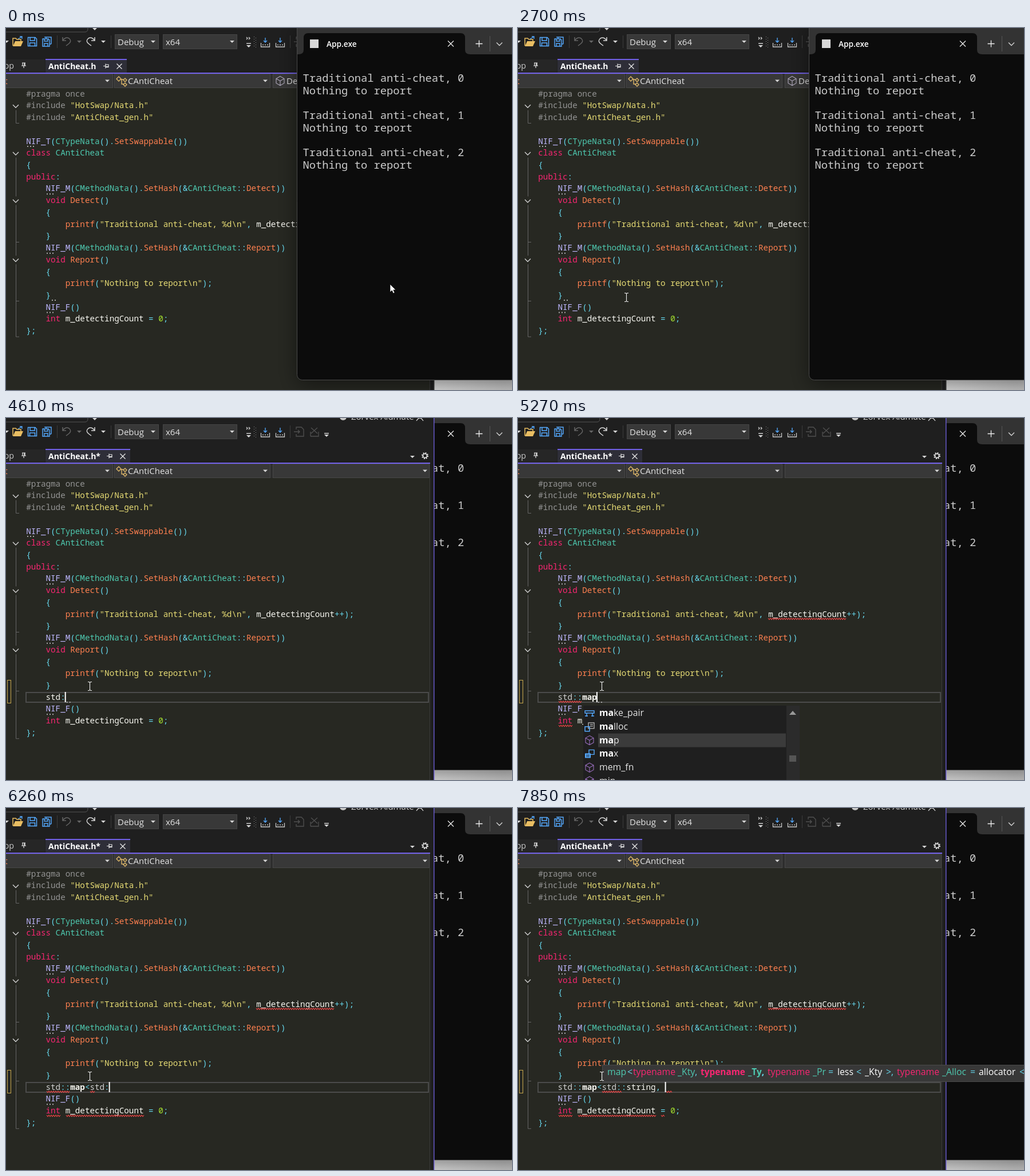
An HTML page with a canvas that plays this animation: 884 by 633 pixels, repeating every 8000 ms.

```html
<!DOCTYPE html>
<html lang="en">
<head>
<meta charset="utf-8">
<title>Live code editing</title>
<style>
html, body { margin: 0; width: 100%; height: 100%; overflow: hidden; background: #1f1f1f; }
canvas { display: block; width: 884px; height: 633px; }
</style>
</head>
<body>
<canvas id="stage" width="884" height="633"></canvas>
<script>
const ctx = document.getElementById('stage').getContext('2d');
const LOOP = 8000, CLICK = 2870, ENTER = 3670;
const UI = '"Open Sans", "Noto Sans", sans-serif', MONO = '"Noto Sans Mono", "DejaVu Sans Mono", monospace';
const CODE_X = 35.3, CHAR = 8.55, ROW = 20.72;
const C = { pink: '#f92672', teal: '#4ec9b0', cyan: '#66d9ef', orange: '#ff8050', yellow: '#e6db74',
  green: '#a6e22e', macro: '#beb7ff', gray: '#949494', white: '#f8f8f2', purple: '#7160e8', ui: '#e4e4e4' };

const CODE = `#pragma once
#include "HotSwap/Nata.h"
#include "AntiCheat_gen.h"

NIF_T(CTypeNata().SetSwappable())
class CAntiCheat
{
public:
    NIF_M(CMethodNata().SetHash(&CAntiCheat::Detect))
    void Detect()
    {
        printf("Traditional anti-cheat, %d\\n", m_detectingCount++);
    }
    NIF_M(CMethodNata().SetHash(&CAntiCheat::Report))
    void Report()
    {
        printf("Nothing to report\\n");
    }
    NIF_F()
    int m_detectingCount = 0;
};`.split('\n');

const TYPING = [[3670, ''], [4090, 's'], [4210, 'st'], [4340, 'std'], [4610, 'std:'], [4810, 'std::'],
  [4940, 'std::m'], [5070, 'std::ma'], [5200, 'std::map'], [5510, 'std::map<'], [5730, 'std::map<s'],
  [5860, 'std::map<st'], [6000, 'std::map<std'], [6220, 'std::map<std:'], [6370, 'std::map<std::'],
  [6560, 'std::map<std::s'], [6880, 'std::map<std::st'], [7050, 'std::map<std::str'],
  [7190, 'std::map<std::stri'], [7280, 'std::map<std::strin'], [7360, 'std::map<std::string'],
  [7630, 'std::map<std::string,'], [7800, 'std::map<std::string, ']];

const STD_ITEMS = ['static_assert', 'static_cast', 'std', 'stdext', 'strcat', 'strcmp'];
const ST_ITEMS = ['remove_const', 'remove_const_t', 'rethrow_if_nested', 'round_to_nearest', 'static_pointer_cast', 'std'];
const POPUPS = [
  { from: 4130, to: 4610, x: 72, w: 529, items: STD_ITEMS, selected: 2, match: 'st' },
  { from: 4860, to: 5510, x: 114, w: 378, items: ['make_pair', 'malloc', 'map', 'max', 'mem_fn', 'min'], selected: 2, match: 'ma' },
  { from: 5770, to: 6220, x: 149, w: 416, items: STD_ITEMS, selected: 2, match: 'st' },
  { from: 6420, to: 7120, x: 192, w: 378, items: ST_ITEMS, selected: 4, match: 'st' },
  { from: 7120, to: 7360, x: 192, w: 378, items: ['basic_string', 'strcat', 'strcmp', 'string', 'stringbuf', 'strlen'], selected: 3, match: 'str' }];
const TOOLTIPS = [[5550, 5770, 540, 0], [5770, 6220, 449, 0], [7670, 7760, 540, 1], [7760, 8000, 449, 1]];
const POINTER = [[0, 671, 448], [950, 671, 448], [1450, 508, 464], [1550, 508, 464], [1740, 359, 472],
  [1760, 358, 472], [2180, 262, 477], [2560, 194, 471], [2660, 194, 471], [2870, 146, 469], [8000, 146, 469]];

function text(s, x, y, color = C.ui, size = 15, weight = 400, family = UI) {
  ctx.font = `${weight} ${size}px ${family}`;
  ctx.fillStyle = color;
  ctx.fillText(s, x, y);
  return x + ctx.measureText(s).width;
}
function rect(x, y, w, h, color) { ctx.fillStyle = color; ctx.fillRect(x, y, w, h); }
function frame(x, y, w, h, color, width = 1) {
  ctx.strokeStyle = color; ctx.lineWidth = width;
  ctx.strokeRect(x + width / 2, y + width / 2, w - width, h - width);
}
function path(d, color, width = 1, x = 0, y = 0) {
  ctx.save();
  ctx.translate(x, y);
  if (width) { ctx.strokeStyle = color; ctx.lineWidth = width; ctx.stroke(new Path2D(d)); }
  else { ctx.fillStyle = color; ctx.fill(new Path2D(d)); }
  ctx.restore();
}
const triangle = (x, y, color = '#d6d6d6') => path('M-4 -2H4L0 2Z', color, 0, x, y);
const cross = (x, y, r = 4.5) => path(`M${-r} ${-r}L${r} ${r}M${r} ${-r}L${-r} ${r}`, '#e8e8e8', 1.3, x, y);
const chevron = (x, y) => path('M-5 -2.5L0 2.5L5 -2.5', '#d0d0d0', 1.4, x, y);
const cube = (x, y, color) => path('M0 -8L7 -4V4L0 8L-7 4V-4ZM-7 -4L0 0L7 -4M0 0V8', color, 1.2, x, y);
const pin = (x, y) => path('M-5 0H-1M-1 -4V4M-1 -2.5H4V2H-1M-1 1H4', C.ui, 1.2, x, y);
function dots(x, y, n = 3) { for (let i = 0; i < n; i++) rect(x + i * 5, y, 2, 2, '#a8a8a8'); }
function squiggle(x0, x1, y) {
  let d = `M${x0} ${y}`;
  for (let x = x0 + 2, i = 0; x <= x1; x += 2, i++) d += `L${x} ${y + (i % 2 ? 0 : 2.5)}`;
  path(d, '#f04545', 1.1);
}
const rowY = i => 115 + ROW * i;

function tokenColor(token, rest) {
  if (token[0] === '#' || token === 'once') return C.gray;
  if (token[0] === '"') return C.yellow;
  if (/^NIF_/.test(token)) return C.macro;
  if (/^(class|public|void|int)$/.test(token)) return C.pink;
  if (/^C[A-Z]/.test(token)) return C.teal;
  if (/^\d/.test(token)) return C.green;
  if (/^(Detect|Report)$/.test(token) || /^\w/.test(token) && rest[0] === '(') return C.orange;
  return /^\w/.test(token) ? C.white : C.cyan;
}
function codeLine(line, row, boldMap) {
  for (const m of line.matchAll(/#?\w+|"[^"]*"|[^\w\s"#]+/g)) {
    const bold = boldMap && m[0] === 'map';
    const color = boldMap && m[0] === 'std' ? '#d0d0d0' : tokenColor(m[0], line.slice(m.index + m[0].length));
    text(m[0], CODE_X + m.index * CHAR, rowY(row) + 4.7, color, 14.25, bold ? 700 : 500, MONO);
  }
}

function combo(x, y, w, h, arrow) {
  rect(x, y, w, h, '#383838');
  frame(x, y, w, h, '#464646');
  triangle(arrow, y + h / 2);
}
function saveIcon(x, y) {
  path('M-7.5 -7.5H5L7.5 -5V7.5H-7.5ZM-4 -7V-2H4V-7M-4.5 7V2H4.5V7', '#55aaff', 1.5, x, y);
}
function buildIcon(x) {
  path('M-7.5 1V8H7.5V1M-5 4.5H-3M-1 4.5H1M3 4.5H5', '#c8c8c8', 1.3, x, 25);
  path('M0 -8V0M-3 -3L0 0L3 -3', '#55aaff', 1.3, x, 25);
}

function toolbar() {
  path('M0 7H138Q143 7 143 1V0', '#555');
  triangle(155, 2);
  triangle(1, 24);
  path('M12 31V18H17L19 20H26V23', '#e8bd62', 1.5);
  path('M12 32L16 23H30L26 32Z', '#e8bd62', 0);
  path('M21 19L27 16M24 15H28V19', '#55aaff', 1.3);
  saveIcon(46, 24);
  path('M67 16H79V28M70 16V19M76 28H79', '#55aaff', 1.4);
  path('M64 19H74L76 21V32H64ZM67 19V23H73V19M67 32V27H73V32', '#55aaff', 1.4);
  path('M99 16V22H105M99 22Q104 15 110 18Q116 23 109 28L105 31', '#666', 1.5);
  triangle(128, 24, '#666');
  path('M155 16V22H149M155 22Q150 15 144 18Q138 23 145 28L149 31', '#d8d8d8', 1.5);
  triangle(170, 24);
  for (const x of [89, 183]) rect(x, 13, 1, 22, '#3c3c3c');
  combo(190, 11, 77, 26, 257);
  text('Debug', 195, 29.5);
  combo(274, 11, 130, 26, 395);
  text('x64', 279, 29.5);
  path('M420 16L422 18L420 20M424 16L426 18L424 20M420 27H428', '#d0d0d0', 1.3);
  triangle(424, 32);
  for (let y = 15; y < 34; y += 4) { rect(433, y, 1, 1, '#888'); rect(436, y + 2, 1, 1, '#888'); }
  buildIcon(453);
  buildIcon(479);
  rect(496, 13, 1, 22, '#3c3c3c');
  path('M507 20V16H516L520 20V32H507V28M503 24H513M510 21L513 24L510 27', '#505050', 1.3);
  path('M532 32V24M532 32H546V24M533 17L544 27M544 17L533 27', '#505050', 1.3);
  rect(556, 26, 8, 1.5, '#d0d0d0');
  triangle(560, 31);
  ctx.fillStyle = '#c8c8c8';
  ctx.beginPath(); ctx.arc(589, -2, 6, 0, 7); ctx.fill();
  text('Zorvex Aidmate', 603, 2.5, '#d0d0d0');
  path('M717 5Q723 -5 729 5', '#d0d0d0', 1.3);
}

function tabsAndNav(t) {
  const edited = t >= ENTER, right = edited ? 217 : 211;
  rect(0, 55, 68, 24, '#262626');
  ctx.textAlign = 'right';
  text('App.cpp', 14, 71, '#c8c8c8', 14.3);
  ctx.textAlign = 'left';
  path('M-3 -4H3M-2 -4V1M2 -4V1M1 -4V1M-4 1H4M0 1V5', C.ui, 1.2, 31, 65);
  rect(69, 54, right - 69, 26, '#2e2e38');
  rect(69, 54, right - 69, 2, C.purple);
  text('AntiCheat.h' + (edited ? '*' : ''), 74, 71.5, '#fff', 14, 700);
  pin(right - 36, 66.5);
  cross(right - 13, 67);
  triangle(710, 68);
  ctx.setLineDash([2, 1.9]);
  path('M737 66A5 5 0 1 1 727 66A5 5 0 1 1 737 66', C.ui, 2);
  ctx.setLineDash([]);
  path('M735.5 66A3.5 3.5 0 1 1 728.5 66A3.5 3.5 0 1 1 735.5 66', C.ui, 1.6);
  rect(0, 78, 741, 2, C.purple);
  rect(0, 80, 741, 25, '#2e2e2e');
  combo(-5, 80, 192, 25, 177);
  combo(189, 80, 273, 25, 453);
  combo(466, 80, 274, 25, 732);
  text('t', -2.5, 98, C.orange);
  path('M197 85L201 89L197 93L193 89ZM200 90H205M202 90V98H206M208 88L211 91L208 94L205 91ZM208 96L211 99L208 102L205 99Z', '#dbb568', 1.4);
  text('CAntiCheat', 213, 98);
  if (t < 3800) {
    cube(479, 92.5, '#a9a3b5');
    text(t < 3160 ? 'Detect()' : 'Report()', 490, 98);
  }
}

function editor(t, typed) {
  const edited = t >= ENTER, shift = edited ? 1 : 0;
  rect(0, 105, 740, 528, '#272822');
  if (t >= CLICK) frame(34, edited ? 479 : 458, 705, 19, '#4b4b4b', 2);

  // folding guides
  const end = 540 + shift * ROW;
  path(`M17.5 143V166.5H23M17.5 226V${end}H23M17.5 374.5H23M17.5 477.5H23`, '#666');
  for (const row of [1, 5, 9, 14]) {
    rect(10, rowY(row) - 7, 15, 15, '#272822');
    chevron(17, rowY(row) + 1);
  }
  if (edited) frame(2, 458, 7, 41, '#c9a94e');

  CODE.forEach((line, i) => codeLine(line, i > 17 ? i + shift : i));
  if (edited) codeLine('    ' + typed, 18, t >= 4810);

  dots(37, 206);
  for (const row of [8, 13, 18 + shift]) dots(71, rowY(row) + 8.5);
  const typedEnd = CODE_X + (4 + typed.length) * CHAR;
  if (!edited) dots(80, 475, 2);
  else if (t < 5730) dots(typedEnd + 2, 496, 2);

  if (t >= 5250) { squiggle(437, 573, 350); squiggle(71, 95, 537); }
  if (t >= 5250 && t < 6370) squiggle(71, 111, 495);
  if (t >= 5550) squiggle(147, t >= 7630 ? 181 : 155, 495);
  if (t >= 5900) squiggle(105, 241, 537);
  if (t >= 7300) squiggle(250, 257, 537);
  if (t >= 7800) squiggle(259, 269, 495);

  if (edited) rect(typedEnd - 1, 479, 2, 18, '#fff');
  else if (t >= CLICK && t < 3400) rect(78, 458, 2, 19, '#fff');
}

function ideWindow(t, typed) {
  ctx.save();
  ctx.beginPath(); ctx.rect(0, 0, 749, 633); ctx.clip();
  rect(0, 0, 748, 633, '#1f1f1f');
  toolbar();
  tabsAndNav(t);
  editor(t, typed);
  rect(740, 105, 1, 528, '#3b3b3b');
  rect(747, 0, 1.5, 633, t < CLICK ? '#3a3a3a' : '#6658c8');
  ctx.restore();
}

function terminal() {
  const outline = new Path2D();
  outline.roundRect(508.5, -10, 400, 625.5, 9);
  ctx.save();
  ctx.shadowColor = 'rgba(0, 0, 0, 0.45)';
  ctx.shadowBlur = 36;
  ctx.shadowOffsetY = 8;
  ctx.fillStyle = '#0c0c0c';
  ctx.fill(outline);
  ctx.restore();

  ctx.save();
  ctx.clip(outline);
  rect(508, 0, 376, 46, '#333');
  path('M511 46Q520 46 520 38V17Q520 9 528 9H794Q802 9 802 17V38Q802 46 811 46Z', '#0c0c0c', 0);
  rect(531, 20, 15, 15, '#d8d8d8');
  text('App.exe', 560, 33, '#fff', 13.7, 600);
  cross(777, 27.5, 5);
  path('M820.5 27.5H832.5M826.5 21.5V33.5', '#eee', 1.3);
  rect(845, 14, 1, 27, '#555');
  chevron(862, 28);
  for (let i = 0; i < 3; i++) {
    text('Traditional anti-cheat, ' + i, 518.5, 94.3 + i * 65, '#ccc', 18.8, 500, MONO);
    text('Nothing to report', 518.5, 116 + i * 65, '#ccc', 18.8, 500, MONO);
  }
  ctx.restore();
  ctx.strokeStyle = '#4a4a4a'; ctx.lineWidth = 1;
  ctx.stroke(outline);
}

function desktop() {
  const g = ctx.createLinearGradient(748, 0, 884, 0);
  g.addColorStop(0, '#e2e2e2');
  g.addColorStop(1, '#c8c8c8');
  rect(740, 600, 144, 33, g);
}

function itemIcon(kind, x, y) {
  if (kind === 0) path('M-8 -4H8V0H-8ZM-5 0V6M5 0V6M-8 5H-3M3 5H8', '#55aaff', 1.4, x, y);
  else if (kind === 1) {
    path('M-2 -7H8V3H-2ZM1 -4H6M1 -1H6', '#bbb', 1.3, x, y);
    path('M-8 0H0V8H-8Z', '#55aaff', 1.5, x, y);
  } else if (kind === 3) {
    path('M-1 -7H8V1H-1Z', '#55aaff', 1.4, x, y);
    path('M-8 -1H2V7H-8Z', '#55aaff', 0, x, y);
    path('M-6 2H0M-6 4.5H0', '#1f1f1f', 1, x, y);
  } else cube(x, y, '#8f68b0');
}
function popup({ x, w, items, selected, match }) {
  rect(x, 503, w, 130, '#1f1f1f');
  rect(x + w - 23, 503, 23, 130, '#2b2b2b');
  path('M-6 3H6L0 -4Z', '#999', 0, x + w - 12, 516);
  rect(x + w - 18, 590, 12, 11, '#555');
  items.forEach((item, i) => {
    const y = 516 + i * 23.8;
    if (i === selected) rect(x + 26, y - 12, w - 50, 24, '#3b3b3b');
    itemIcon(i, x + 11, y);
    const at = item.lastIndexOf(match), stop = at + match.length;
    if (at < 0) return text(item, x + 28, y + 5, C.ui, 15.8);
    let px = text(item.slice(0, at), x + 28, y + 5, C.ui, 15.8);
    px = text(item.slice(at, stop), px, y + 5, '#fff', 15.8, 700);
    text(item.slice(stop), px, y + 5, C.ui, 15.8);
  });
}

function tooltip(y, active) {
  rect(147, y, 740, 30, '#383838');
  frame(147, y, 740, 30, '#4a4a4a');
  const put = (s, x, color, bold) => text(s, x, y + 17.5, color, bold ? 15.4 : 15.8, bold ? 700 : 400);
  put('map', 156, C.teal);
  put('<', 191, C.cyan);
  const starts = active ? [201, 279, 319, 402, 436, 515] : [201, 284, 326, 403, 436, 515];
  ['_Kty', '_Ty', '_Pr'].forEach((name, i) => {
    const bold = i === active;
    put('typename', starts[2 * i], C.pink, bold);
    const end = put(name, starts[2 * i + 1], C.teal, bold);
    if (i < 2) put(',', end, C.cyan, bold);
  });
  put('=', 542, C.cyan);
  put('less', 558, '#fff');
  put('<', 591, C.cyan);
  put('_Kty', 606, '#fff');
  put('>,', 643, C.cyan);
  put('typename', 662, C.pink);
  put('_Alloc', 741, C.teal);
  put('=', 790, C.cyan);
  put('allocator', 805, '#fff');
  put('<', 876, C.cyan);
}

function pointer(t) {
  const i = POINTER.findIndex(k => k[0] > t), [t0, x0, y0] = POINTER[i - 1], [t1, x1, y1] = POINTER[i];
  const p = (t - t0) / (t1 - t0), e = p * p * (3 - 2 * p);
  const x = Math.round(x0 + (x1 - x0) * e), y = Math.round(y0 + (y1 - y0) * e);
  if (x > 516) {
    const arrow = 'M0 0V14L3.3 11L5.5 16L8 15L5.8 10H10Z';
    path(arrow, '#fff', 0, x, y);
    path(arrow, '#000', 0.7, x, y);
  } else if (x > 501) {
    path('M-9 0H9M-6 -3L-9 0L-6 3M6 -3L9 0L6 3', '#fff', 1.6, x, y + 0.5);
  } else {
    path('M-3 -7.5H-1L0.5 -6.5L2 -7.5H4M0.5 -7V7M-3 7.5H-1L0.5 6.5L2 7.5H4', '#f0f0f0', 1.1, x, y);
  }
}

function draw(now) {
  const t = now % LOOP;
  const typed = TYPING.reduce((s, [at, str]) => t >= at ? str : s, '');
  rect(0, 0, 884, 633, '#1f1f1f');
  desktop();
  if (t < CLICK) { ideWindow(t, typed); terminal(); }
  else { terminal(); ideWindow(t, typed); }
  POPUPS.filter(p => t >= p.from && t < p.to).forEach(popup);
  for (const [from, to, y, active] of TOOLTIPS) if (t >= from && t < to) tooltip(y, active);
  pointer(t);
}

const start = performance.now();
function tick() {
  draw(performance.now() - start);
  requestAnimationFrame(tick);
}
tick();
</script>
</body>
</html>
```
